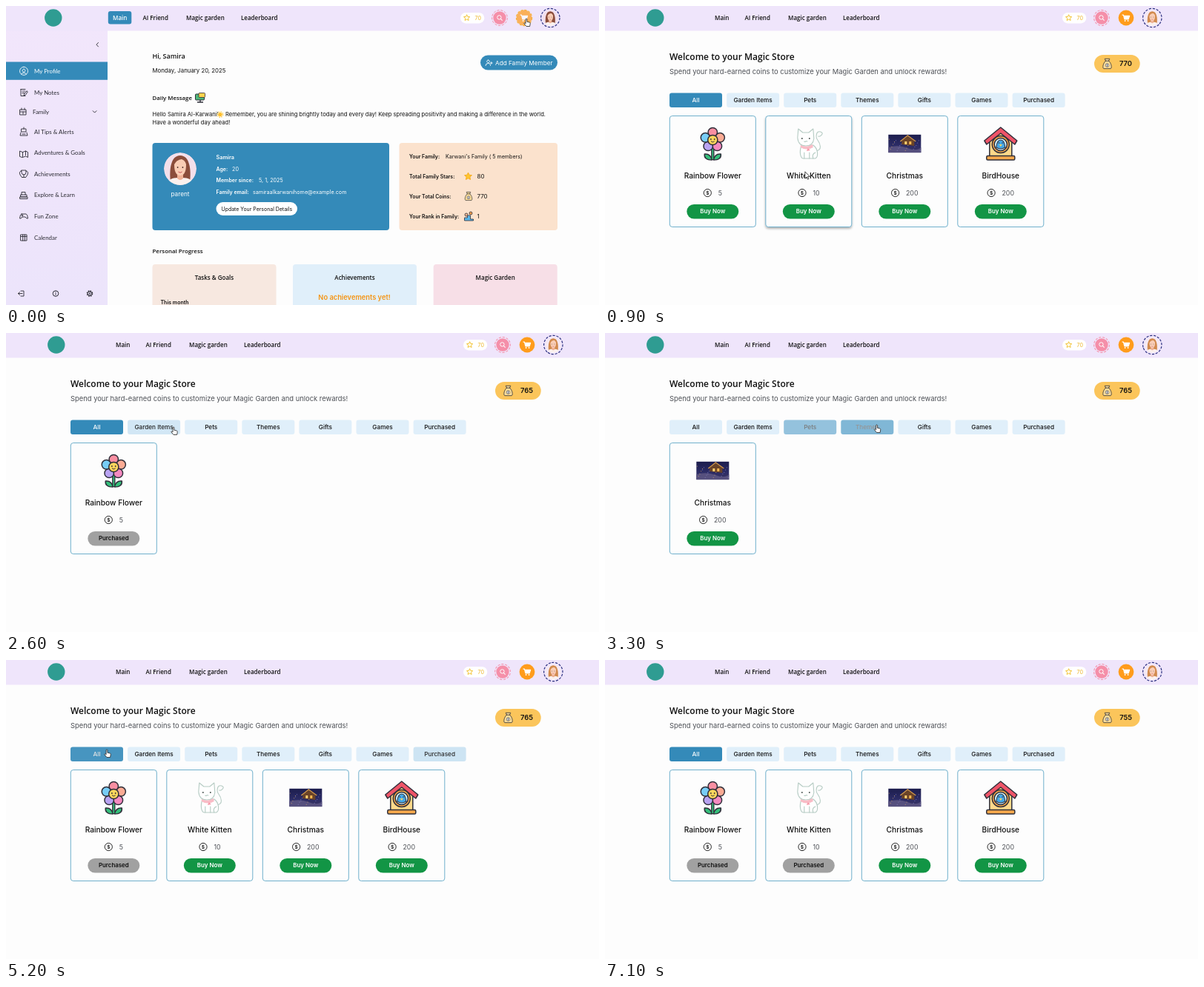
An HTML page for the animation above (7200 ms loop, 800 by 404 pixels).

```html
<!DOCTYPE html>
<html lang="en">
<head>
<meta charset="utf-8">
<title>Magic Store</title>
<style>
  html, body { margin: 0; width: 100%; height: 100%; overflow: hidden; background: #fdfdfd; }
  svg { display: block; width: 800px; height: 404px; }
  text { font-family: Inter, sans-serif; fill: #111; }
  .comic { font-family: "Open Sans", sans-serif; font-weight: 600; }
  .side { font-family: Lato, sans-serif; fill: #2b2b33; }
  .mid { font-weight: 500; }
  .bold { font-weight: 600; }
  .center { text-anchor: middle; }
  .end { text-anchor: end; }
  .white { fill: #fff; }
  .grey { fill: #4d5056; }
  .line { fill: none; stroke: #2b2b33; stroke-width: .9; stroke-linecap: round; stroke-linejoin: round; }
  .ink { stroke: #2f2f3a; stroke-width: 1.5; stroke-linejoin: round; stroke-linecap: round; }
</style>
</head>
<body>
<svg id="stage" viewBox="0 0 800 404">
  <defs>
    <linearGradient id="lilac" x2="0" y2="1">
      <stop stop-color="#f2e6fb"/><stop offset="1" stop-color="#ece4fb"/>
    </linearGradient>
    <linearGradient id="night" x2="0" y2="1">
      <stop stop-color="#1c1d4d"/><stop offset=".6" stop-color="#2c2c66"/><stop offset="1" stop-color="#3b3560"/>
    </linearGradient>
    <filter id="shade" x="-10%" y="-10%" width="120%" height="120%">
      <feDropShadow dx="0" dy="2" stdDeviation="1.5" flood-opacity=".3"/>
    </filter>
    <clipPath id="round"><circle r="22"/></clipPath>
  </defs>
  <g id="home"></g>
  <g id="store"></g>
  <g id="header"></g>
  <g id="cursor"></g>
</svg>
<script>
const LOOP = 7200, STEP = 100, OPEN_STORE = 200, FADE = 300;
const BLUE = '#348ab9', PALE = '#e0effa';
const $ = id => document.getElementById(id);

const text = (x, y, size, str, cls = '', extra = '') =>
  `<text x="${x}" y="${y}" font-size="${size}" class="${cls}" ${extra}>${str}</text>`;
const rect = (x, y, w, h, r, fill, extra = '') =>
  `<rect x="${x}" y="${y}" width="${w}" height="${h}" rx="${r}" fill="${fill}" ${extra}/>`;
const disc = (x, y, r, fill, extra = '') =>
  `<circle cx="${x}" cy="${y}" r="${r}" fill="${fill}" ${extra}/>`;
const path = (d, fill = 'none', extra = '') => `<path d="${d}" fill="${fill}" ${extra}/>`;
const line = (d, extra = '') => `<path d="${d}" class="line" ${extra}/>`;
const at = (x, y, body, s = 1) => `<g transform="translate(${x} ${y}) scale(${s})">${body}</g>`;

function star(r, fill, stroke) {
  const pts = Array.from({ length: 10 }, (_, i) => {
    const a = i * Math.PI / 5, d = i % 2 ? r * .48 : r;
    return (d * Math.sin(a)).toFixed(2) + ',' + (-d * Math.cos(a)).toFixed(2);
  });
  return `<polygon points="${pts.join(' ')}" fill="${fill}" stroke="${stroke}" stroke-width="1" stroke-linejoin="round"/>`;
}

// Illustrations, each centred on 0,0
const woman = (hair, back) => `<g clip-path="url(#round)">` +
  disc(0, 0, 22, back) +
  path('M-13 17C-15 2-13-18 0-18S15 2 13 17Z', hair) +
  path('M-19 24C-17 12-8 12 0 12S17 12 19 24Z', '#fbf1ee') +
  path('M-4 5H4V13Q0 17-4 13Z', '#efb196') +
  path('M-8-6Q-8 9 0 9T8-6Q7-11 2-13Q-5-12-8-6Z', '#f9cdb5') +
  path('M-10 0Q-9-12 2-14Q9-11 10 0Q12-17 0-17T-10 0Z', hair) +
  disc(-3.4, -2, .9, '#4a2c2a') + disc(3.4, -2, .9, '#4a2c2a') +
  path('M-2.5 4Q0 6.5 2.5 4', 'none', 'stroke="#c9565b" stroke-width="1"') + '</g>';

const bag = path('M-2-4L-3.5-7H3.5L2-4C6-1 7 6 5 7H-5C-7 6-6-1-2-4Z', '#fbdc9a', 'stroke="#3a3a3a" stroke-width=".9"') +
  line('M-2.6-4H2.6') + disc(0, 2.2, 2.4, '#fff', 'stroke="#3a3a3a" stroke-width=".7"') +
  line('M0 1V3.4', 'stroke-width=".7"');

const dollar = disc(0, 0, 5.1, 'none', 'stroke="#222"') + text(0, 2.4, 6.6, '$', 'center bold');

const petals = ['#f98fa2', '#fbab94', '#f58ac0', '#b9a3f2', '#77cdf6'];
const flower =
  path('M0 5V22', 'none', 'stroke="#2f2f3a" stroke-width="4.4"') +
  path('M-1 22Q-3 13-11 14Q-12 22-1 22ZM1 22Q3 13 11 14Q12 22 1 22Z', '#35c07b', 'class="ink"') +
  path('M0 5V21', 'none', 'stroke="#35c07b" stroke-width="1.8"') +
  petals.map((c, i) => {
    const a = i * Math.PI * .4;
    return disc(10.4 * Math.sin(a), -5 - 10.4 * Math.cos(a), 6.2, c, 'class="ink"');
  }).join('') +
  disc(0, -5, 6.6, '#ffd65c', 'class="ink"') +
  disc(-2.4, -6, .9, '#2f2f3a') + disc(2.4, -6, .9, '#2f2f3a') +
  path('M-2-3Q0-.6 2-3', 'none', 'class="ink" style="stroke-width:1"');

const soft = 'stroke="#b5cbc3" stroke-width="1.1" stroke-linejoin="round" stroke-linecap="round"';
const cat =
  path('M8 10C20 10 15-1 12-5S10-18 16-16S15-9 13-10', 'none', soft) +
  path('M-10 3C-13 12-11 20-7 20H9C14 17 12 6 6 2Z', '#fff', soft) +
  path('M-15-8L-14-20L-8-15H0L6-20L7-7Q6 3-4 3T-15-8Z', '#fff', soft) +
  path('M-6 20V12M1 20V12M6 20Q4 14 9 12', 'none', soft) +
  path('M-11 2Q-3 6 5 1L6 5Q-3 10-11 5Z', '#f9bcc6') +
  path('M-1 6L-3 10L2 9Z', '#f59aaa') +
  disc(-9, -7, 1, '#4b5752') + disc(1, -7, 1, '#4b5752') +
  path('M-6-3Q-5-2-4-3T-2-3', 'none', soft);

const lights = Array.from({ length: 26 }, (_, i) =>
  disc((i * 7.3 % 42 - 21).toFixed(1), (i * 5.1 % 17 - 6).toFixed(1), .5, i % 3 ? '#8a86c8' : '#d9a96a')).join('');
const christmas = rect(-22, -12.2, 44, 24.4, 0, 'url(#night)') +
  path('M-22 12V5Q-8 1 4 6T22 5V12Z', '#56507e') + lights +
  path('M-4 1V-4L4-10L13-4V3Z', '#6b4428') +
  path('M-6-3L4-11L15-3', 'none', 'stroke="#d99b45" stroke-width="1.2"') +
  rect(0, -3, 3, 4, 0, '#ffd070') + rect(6, -3, 3, 4, 0, '#f9b750');

const birdhouse =
  path('M-15-6L0-18L15-6V17H-15Z', '#ffd98a', 'class="ink"') +
  path('M0-22L-22-4L-19 1L0-14L19 1L22-4Z', '#ef5468', 'class="ink"') +
  disc(0, 1, 11.5, '#f5a84c', 'class="ink"') + disc(0, 1, 8.6, '#cdeefd', 'class="ink"') +
  path('M-6 5Q-5-5 0-5T6 5Q0 9-6 5Z', '#46a9e8', 'class="ink" style="stroke-width:1.1"') +
  path('M-2 1H2L0 4Z', '#ffd65c') + disc(-2.3, -1, .8, '#2f2f3a') + disc(2.3, -1, .8, '#2f2f3a') +
  rect(-19, 16.5, 38, 5.5, 1.5, '#f5a84c', 'class="ink"');

const items = [
  { name: 'Rainbow Flower', price: 5, art: flower, bought: 1300 },
  { name: 'White Kitten', price: 10, art: cat, bought: 6000 },
  { name: 'Christmas', price: 200, art: christmas, bought: Infinity },
  { name: 'BirdHouse', price: 200, art: birdhouse, bought: Infinity }
];
const tabs = ['All', 'Garden Items', 'Pets', 'Themes', 'Gifts', 'Games', 'Purchased'];
const clicks = [[0, 0], [2600, 1], [2900, 2], [3200, 3], [3700, 4], [4100, 5], [4500, 6], [5000, 0]];
const trail = [
  [0, 702, 17], [400, 702, 17], [1100, 163, 275], [1300, 166, 271], [1500, 171, 271], [1800, 171, 271],
  [2500, 226, 127], [2600, 226, 127], [2900, 292, 127], [3200, 356, 124], [3300, 366.5, 124],
  [3700, 430, 126], [4100, 506, 126], [4500, 582, 126], [5000, 142, 122], [5200, 136, 121],
  [5600, 250, 306], [5900, 270, 278], [6200, 272, 278], [6900, 420, -14], [LOOP, 420, -14]
];

function pointer(t) {
  const i = trail.findIndex(k => k[0] > t);
  const [t0, x0, y0] = trail[i - 1], [t1, x1, y1] = trail[i];
  const u = (t - t0) / (t1 - t0), e = u * u * (3 - 2 * u);
  return { x: x0 + (x1 - x0) * e, y: y0 + (y1 - y0) * e };
}
const inside = (p, x, y, w, h) => p.x >= x && p.x <= x + w && p.y >= y && p.y <= y + h;
const mix = (a, b, k) => `rgb(${a.map((v, i) => Math.round(v + (b[i] - v) * k))})`;

const tabX = i => 87 + 77.1 * i;
const cardX = i => 87.3 + 129.5 * i;

function visible(t, tab) {
  if (tab === 0) return items;
  if (tab === 6) return items.filter(it => it.bought <= t);
  return items.filter((_, i) => i === tab - 1);
}

function tabBar(t, p) {
  const n = clicks.findLastIndex(c => c[0] <= t);
  const now = clicks[n][1], before = n ? clicks[n - 1][1] : -1;
  const u = n ? Math.min(1, (t - clicks[n][0]) / FADE) : 1, k = 1 - (1 - u) ** 2;
  return tabs.map((name, i) => {
    const hover = inside(p, tabX(i), 117.5, 71, 19.5) ? .08 : 0;
    const level = Math.max(hover, i === now ? k : i === before ? 1 - k : 0);
    return rect(tabX(i), 117.5, 71, 19.5, 3, mix([224, 239, 250], [52, 138, 185], level)) +
      text(tabX(i) + 35.5, 130, 8.2, name, 'center mid', `style="fill:${mix([17, 17, 17], [255, 255, 255], level)}"`);
  }).join('');
}

function card(it, i, t, p) {
  const x = cardX(i), c = x + 58, sold = it.bought <= t;
  const digits = String(it.price).length, coin = c + [-7, -8.8, -12.7][digits - 1];
  const shade = inside(p, x, 148.5, 116, 150) ? 'filter="url(#shade)"' : '';
  return rect(x, 148.5, 116, 150, 3.5, '#fdfdfd', `stroke="#6fb0cc" ${shade}`) +
    at(c, 186, it.art) +
    text(c, 232.5, 10.2, it.name, 'center mid') +
    at(coin, 252.5, dollar) + text(coin + 14.4, 255.7, 8.8, it.price, 'grey') +
    rect(c - 35, 268, 70, 19.5, 9.75, sold ? '#a1a1a1' : '#129545') +
    text(c, 280.4, 7.9, sold ? 'Purchased' : 'Buy Now', 'center bold' + (sold ? '' : ' white'));
}

function store(t, p, shown) {
  const coins = items.reduce((sum, it) => sum - (it.bought <= t ? it.price : 0), 770);
  return text(87, 73, 12, 'Welcome to your Magic Store', 'comic') +
    text(87, 92, 9.4, 'Spend your hard-earned coins to customize your Magic Garden and unlock rewards!', 'grey') +
    rect(660, 66, 61.7, 24, 12, '#fbc55b') + at(677.5, 78, bag, .95) +
    text(711, 81.3, 9.4, coins, 'end bold') +
    tabBar(t, p) + shown.map((it, i) => card(it, i, t, p)).join('');
}

function header(t, home, hover) {
  const spin = t / LOOP * 360;
  const ring = (x, r, c, w) => disc(x, 16, r, 'none',
    `stroke="${c}" stroke-width="${w}" stroke-dasharray="3.2 1.8" transform="rotate(${spin} ${x} 16)"`);
  const nav = [[148, 'Main'], [188.5, 'AI Friend'], [247, 'Magic garden'], [321, 'Leaderboard']];
  const cart = disc(703, 16, 10.4, '#ff9c1c') +
    path('M697.6 12.2H699.4L700.9 17.8H706.2L707.6 13.4H700', 'none', 'stroke="#fff" stroke-width="1.2" stroke-linejoin="round"') +
    path('M700 13.4H707.6L706.2 17.8H701Z', '#fff') + disc(701.6, 20, .9, '#fff') + disc(705.6, 20, .9, '#fff');
  return rect(0, 0, 800, 33.5, 0, '#efe5fb') + at(home ? -4 : 0, 0,
    disc(67.8, 16, 11.7, '#2f9c92') +
    (home ? rect(141.8, 7, 31.5, 17.5, 3, BLUE) : '') +
    nav.map(([x, s], i) => text(x, 18.8, 8, s, 'comic' + (home && !i ? ' white' : ''))).join('') +
    rect(617, 9, 32.3, 14.4, 7.2, '#fff') + at(625.6, 16, star(4.3, '#fffbe8', '#f3c53c')) +
    text(636.6, 18.8, 7, '70', 'mid', 'style="fill:#efbf45"') +
    disc(670, 16, 8.7, '#f58fa9') + ring(670, 10.4, '#f58fa9', 1) +
    disc(669.4, 15.4, 2.7, 'none', 'stroke="#fff"') + path('M671.4 17.4L673.6 19.6', 'none', 'stroke="#fff" stroke-width="1.1"') +
    (hover ? `<g opacity=".72">${cart}</g>` + ring(703, 10.6, '#f5b23c', 1.1) : cart) +
    at(738.3, 16, home ? woman('#8b4d3b', '#f3dfea') : woman('#d18a4e', '#f6e9f2'), .48) +
    ring(738.3, 12.7, '#2d3280', 1.2));
}

function home() {
  const sq = (x, y) => line(`M${x - 4} ${y - 4}h8v8h-8zM${x - 4} ${y - 1.5}h8M${x - 1.3} ${y - 4}v8M${x + 1.3} ${y - 4}v8`);
  const menu = [
    [91, 'My Profile', ''],
    [119.8, 'My Notes', line('M20 112.5h6M20 112.5v9h6M22 115h4M22 117.5h3M28 115l-3.5 4-.5 2 2-.5 3-4z')],
    [145.7, 'Family', line('M19 140h8v7h-8zM19 143h8M21 138v2M25 138v2M23 143v3')],
    [172.7, 'AI Tips &amp; Alerts', line('M21 166h6v4h-6zM24 166v-2M20 171l-1 4h10l-1-4M22 173h4')],
    [201.2, 'Adventures &amp; Goals', line('M18.5 203v-7l4 1.5 4-1.5 3 1.5v7l-3-1.5-4 1.5zM22.5 197.5v6M26.5 196v5.5')],
    [229.8, 'Achievements', line('M21 222h6v3q0 3-3 3t-3-3zM21 223q-4 0-2 5l2 3M27 223q4 0 2 5l-2 3M24 228v3M21.5 231.5h5')],
    [258.3, 'Explore &amp; Learn', line('M19 258h10v2.5H19zM20 255h8v3h-8zM21 255v-3.5h5V255')],
    [287, 'Fun Zone', line('M21 281h6q2 0 2.5 6-1.5 1-3.5-2h-4q-2 3-3.5 2Q19 281 21 281zM22 282v2M21 283h2')],
    [315.6, 'Calendar', sq(24, 313)]
  ];
  const pair = (x, y, k, x2, v) => text(x, y, 7, k, 'bold white') + text(x2, y, 7.2, v, 'white');
  const row = (y, k, v) => text(544, y, 6.9, k, 'bold') + text(635.5, y, 8, v);
  const panel = (x, fill, s) => rect(x, 349, 167, 60, 4, fill) + text(x + 83.5, 370, 8, s, 'comic center');
  return rect(0, 0, 137, 404, 0, 'url(#lilac)') +
    line('M124.5 49.5l-2.5 2.7 2.5 2.7') + rect(0, 75.5, 137, 24.3, 0, BLUE) +
    `<g style="--w:1">${line('M24 85.2a2 2 0 1 0 .1 0M20.5 92q3.5-4 7 0M24 82.3a5.5 5.5 0 1 0 .1 0', 'style="stroke:#fff"')}</g>` +
    menu.map(([y, s, icon], i) => icon + text(s === 'Family' ? 36 : 38, y, 7.9, s, 'side', i ? '' : 'style="fill:#fff"')).join('') +
    line('M117.2 141.7l2.4 2.4 2.4-2.4') +
    line('M20 385h4v7h-4M22 388.5h-5.5M18.5 386.5l-2 2 2 2') +
    disc(67, 388.5, 3.8, 'none', 'stroke="#2b2b33"') + line('M67 388v2.2M67 386.3v.1') +
    disc(113, 388.5, 3.4, 'none', 'stroke="#2b2b33" stroke-width="1.8" stroke-dasharray="1.6 1.07"') +
    disc(113, 388.5, 2.6, 'none', 'stroke="#2b2b33" stroke-width=".9"') + disc(113, 388.5, 1, '#2b2b33') +

    text(197.5, 71, 9, 'Hi, Samira', 'comic') + text(197.5, 90, 7.8, 'Monday, January 20, 2025') +
    rect(640, 66.5, 104, 20, 10, BLUE) + text(660, 79.6, 8.2, 'Add Family Member', 'white') +
    line('M650.5 73a1.8 1.8 0 1 0 .1 0M647 80.5q0-3 3.5-3t3 3M653.5 77h2.6M654.8 75.7v2.6', 'style="stroke:#fff"') +
    text(197.5, 127, 7.8, 'Daily Message', 'comic') +
    rect(255.5, 119, 12, 8, 1, '#4fb87a', 'stroke="#2f2f3a"') + rect(260, 117.5, 8.5, 6, 1, '#ffd24d', 'stroke="#2f2f3a" stroke-width=".8"') +
    path('M258 130h8M262 127v3', 'none', 'stroke="#2f2f3a" stroke-width="1.4"') +
    text(197.5, 149.3, 7.6, 'Hello Samira Al-Karwani!') +
    disc(289, 146.6, 3.7, 'none', 'stroke="#ffc93c" stroke-width="1.4" stroke-dasharray="1.4 1.5"') + disc(289, 146.6, 2.6, '#ffbf2b') +
    text(296, 149.3, 7.6, 'Remember, you are shining brightly today and every day! Keep spreading positivity and making a difference in the world.') +
    text(197.5, 159.8, 7.6, 'Have a wonderful day ahead!') +

    rect(197.5, 185, 319.5, 118, 4, BLUE) + at(235, 220, woman('#8b4d3b', '#f3dfea')) +
    text(235, 257, 8.2, 'parent', 'center white') + text(283.5, 207.3, 7.3, 'Samira', 'bold white') +
    pair(283.5, 222.7, 'Age:', 305, '20') + pair(283.5, 238.2, 'Member since:', 341, '5, 1, 2025') +
    pair(283.5, 253.7, 'Family email:', 333, 'samiraalkarwanihome@example.com') +
    rect(283.5, 265, 109.5, 18, 9, '#fff') + text(338.3, 276.5, 6.95, 'Update Your Personal Details', 'center') +

    rect(530.5, 185, 213.5, 118, 4, '#fbe2cd') +
    text(544, 206.3, 6.9, 'Your Family:', 'bold') + text(593, 206.3, 7.1, "Karwani's Family ( 5 members)") +
    row(233, 'Total Family Stars:', 80) + at(623.5, 230.3, star(5.2, '#ffc530', '#f5ae25')) +
    row(260, 'Your Total Coins:', 770) + at(624, 257, bag, .8) +
    row(286.7, 'Your Rank in Family:', 1) +
    path('M618.5 290v-4h4v-3h4v5h4v2z', '#59b6e8', 'stroke="#2f2f3a" stroke-width=".8"') +
    disc(621, 282, 2, '#f7b98f', 'stroke="#2f2f3a" stroke-width=".8"') + disc(627, 280, 2, '#f7a04b', 'stroke="#2f2f3a" stroke-width=".8"') +

    text(197.5, 334.2, 7.9, 'Personal Progress', 'comic') +
    panel(197.5, '#f7e8e0', 'Tasks &amp; Goals') + panel(387, PALE, 'Achievements') + panel(576.7, '#f7dfe7', 'Magic Garden') +
    text(470, 396.8, 9.3, 'No achievements yet!', 'center bold', 'style="fill:#f59412"') +
    text(208.5, 402.5, 7, 'This month', 'bold');
}

const outline = 'stroke="#222" stroke-width=".8" stroke-linejoin="round"';
const cursors = {
  hand: path('M-.9.9C-.9-.3.9-.3.9.9V4.2L4.2 5C5.1 5.3 5.4 6 5.2 7L4.6 10.5H0L-2.9 7C-3.5 6.1-2.4 5.4-1.7 6.1L-.9 6.8Z', '#fff', outline),
  arrow: path('M0 0V9.2L2.2 7.2L3.6 10.4L5 9.8L3.6 6.7H6.5Z', '#fff', outline),
  blocked: disc(0, 0, 3.1, '#fff', 'stroke="#b3242b" stroke-width="1.4"') + path('M-2.2-2.2L2.2 2.2', 'none', 'stroke="#b3242b" stroke-width="1.3"')
};

function cursorKind(t, p, shown, onCart) {
  if (onCart || tabs.some((_, i) => inside(p, tabX(i), 117.5, 71, 19.5))) return 'hand';
  const hit = shown.find((_, i) => inside(p, cardX(i) + 23, 268, 70, 19.5));
  return hit ? (hit.bought <= t ? 'blocked' : 'hand') : 'arrow';
}

function render(t) {
  const p = pointer(t), isHome = t < OPEN_STORE;
  const onCart = Math.hypot(p.x - 703, p.y - 16) < 11;
  const shown = visible(t, clicks.findLast(c => c[0] <= t)[1]);
  $('home').style.display = isHome ? '' : 'none';
  $('store').innerHTML = isHome ? '' : store(t, p, shown);
  $('header').innerHTML = header(t, isHome, onCart);
  $('cursor').innerHTML = at(p.x, p.y, cursors[cursorKind(t, p, shown, onCart)]);
}

// The header bar covers the top of the sidebar in the same tone
$('home').innerHTML = home();
let last = -1;
function tick() {
  const t = Math.floor(performance.now() % LOOP / STEP) * STEP;
  if (t !== last) render(last = t);
  requestAnimationFrame(tick);
}
tick();
</script>
</body>
</html>
```
